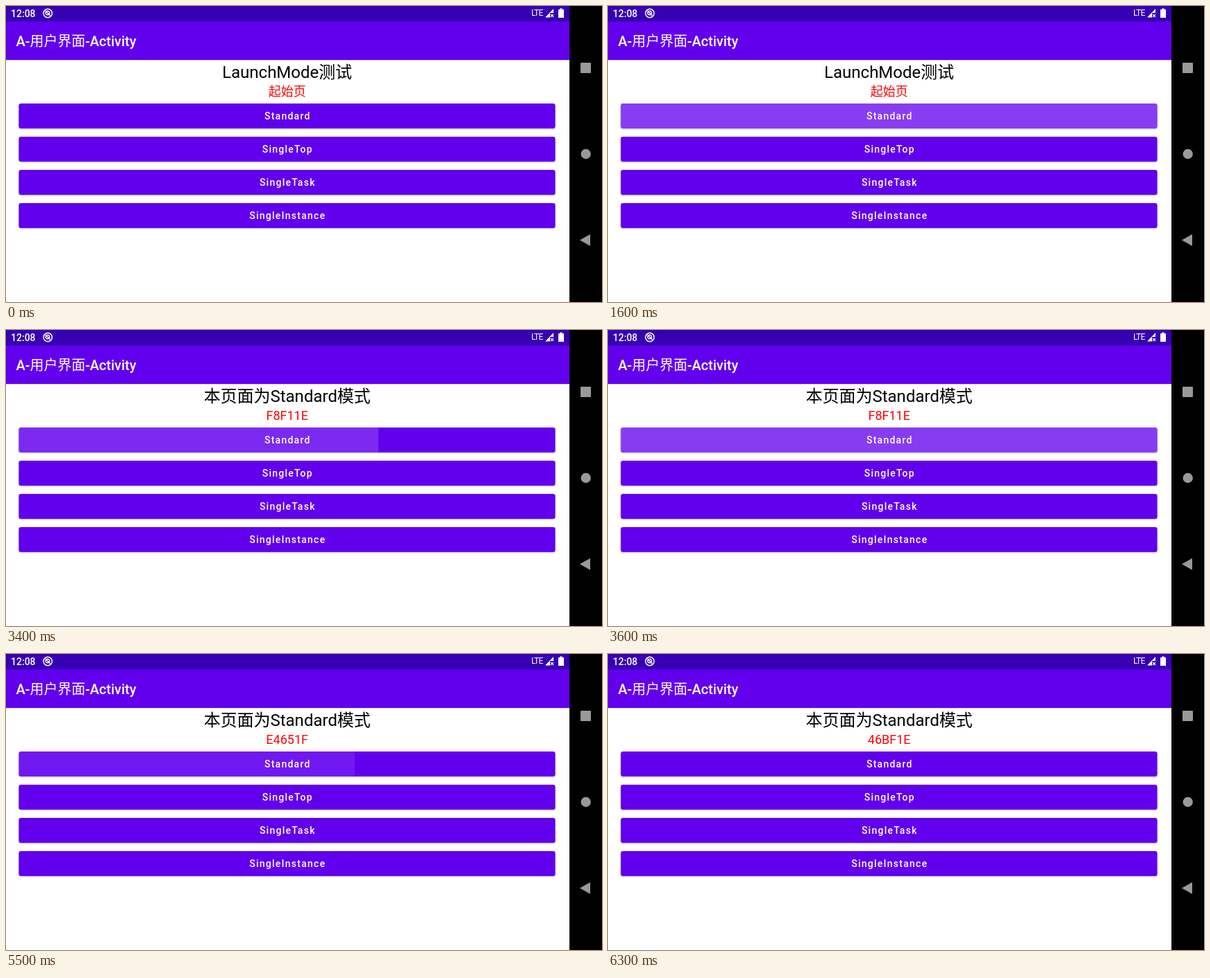
Recreate the animation shown at these times as an HTML page. Size 860 by 428 pixels, loop 8.5 s.

```html
<!DOCTYPE html>
<html lang="zh-CN">
<head>
<meta charset="utf-8">
<style>
html, body { margin: 0; width: 100%; height: 100%; overflow: hidden; background: #000; }
svg { display: block; width: 860px; height: 428px; font-family: Roboto, "Noto Sans CJK SC", "Noto Sans CJK", sans-serif; }
.page { transform-origin: 430px 214px; }
.centered { text-anchor: middle; }
.button { fill: #6200ee; filter: drop-shadow(0 1px 1px rgba(0,0,0,.3)); }
.label { fill: #fff; font-size: 14px; font-weight: 500; letter-spacing: 1.25px; }
</style>
</head>
<body>
<svg viewBox="0 0 860 428">
  <defs><clipPath id="buttonShape"><rect x="18.5" y="141" width="774" height="36" rx="3"/></clipPath></defs>
  <g class="page" id="current"></g>
  <g class="page" id="next"></g>

  <g fill="#fff">
    <text x="7" y="15.5" font-size="14" font-weight="500">12:08</text>
    <g fill="none" stroke="#fff">
      <circle cx="60.3" cy="10.5" r="6.2" stroke-width="1.5"/>
      <circle cx="60" cy="10" r="2.8" stroke-width="1.4"/>
      <path d="M57 7l7 7" stroke-width="1.5"/>
    </g>
    <text x="758" y="14.3" font-size="12" letter-spacing="-.8">LTE</text>
    <path d="M778 16.5L790 4v6h-5v6.5z"/>
    <path d="M786 12l4 4m0-4l-4 4" stroke="#fff" stroke-width="1.2"/>
    <path d="M797 5h2.3V3.5h3.4V5h2.3v12h-8z"/>
  </g>
  <g fill="#999">
    <rect x="829" y="82" width="15" height="15" rx="1"/>
    <circle cx="836.7" cy="214" r="7.2"/>
    <path d="M828 338.5L843 330v17z"/>
  </g>
</svg>
<script>
const LOOP = 8500, STEP = 100;
const modes = ['Standard', 'SingleTop', 'SingleTask', 'SingleInstance'];
const standard = '本页面为Standard模式';
const screens = [
  ['LaunchMode测试', '起始页'],
  [standard, 'F8F11E'],
  [standard, 'E4651F'],
  [standard, '46BF1E']
];
// lead: age of the ripple when it first becomes visible
const launches = [
  { start: 1400, end: 2000, lead: 30 },
  { start: 3400, end: 4100, lead: 52 },
  { start: 5500, end: 6300, lead: 30 }
];

const button = (name, i) => `
  <rect class="button" x="18.5" y="${141 + 48 * i}" width="774" height="36" rx="3"/>
  ${i ? '' : '<rect class="ripple" x="18" y="141" height="36" fill="#fff" clip-path="url(#buttonShape)"/>'}
  <text class="label centered" x="406.3" y="${164 + 48 * i}">${name}</text>`;

function buildPage(id) {
  const root = document.getElementById(id);
  root.innerHTML = `
    <rect width="860" height="428"/>
    <rect width="813" height="428" fill="#fff"/>
    <rect y="78" width="813" height="1" fill="#e6e6e6"/>
    <rect width="813" height="78" fill="#6200ee"/>
    <rect width="813" height="22.5" fill="#3700b3"/>
    <text x="14.5" y="58" font-size="20" font-weight="500" fill="#fff">A-<tspan font-weight="400">用户界面</tspan>-Activity</text>
    <text class="heading centered" x="405.7" y="103.7" font-size="24"></text>
    <text class="tag centered" x="405.7" y="129.7" font-size="18" fill="#f00"></text>
    ${modes.map(button).join('')}`;
  const find = name => root.querySelector('.' + name);
  return { root, heading: find('heading'), tag: find('tag'), ripple: find('ripple') };
}

const current = buildPage('current'), next = buildPage('next');
const clamp = v => Math.min(1, Math.max(0, v));

function showPage(page, screen, scale, opacity, rippleAge) {
  [page.heading.textContent, page.tag.textContent] = screen;
  page.root.style.transform = scale === 1 ? 'none' : `scale(${scale})`;
  page.root.style.opacity = opacity;
  const fade = clamp(rippleAge / 75) * clamp((400 - rippleAge) / 150);
  page.ripple.setAttribute('width', Math.min(774.5, 439 + 1.545 * rippleAge));
  page.ripple.setAttribute('opacity', 0.24 * fade);
}

function render(time) {
  const t = Math.floor(time % LOOP / STEP) * STEP;
  const index = launches.filter(l => t >= l.end).length;
  const launch = launches[index];
  const active = launch && t >= launch.start;
  const opening = active ? Math.max(0, t - launch.end + 360) : 0;
  const progress = 1 - Math.exp(-((opening / 94) ** 2));

  showPage(current, screens[index], 1 + 0.05 * progress, 1,
    active ? t - launch.start + launch.lead : 0);
  showPage(next, screens[index + 1] || screens[index], 0.85 + 0.15 * progress,
    clamp((opening - 35) / 50), 0);
}

const origin = performance.now();
function tick() {
  render(performance.now() - origin);
  requestAnimationFrame(tick);
}
tick();
</script>
</body>
</html>
```
